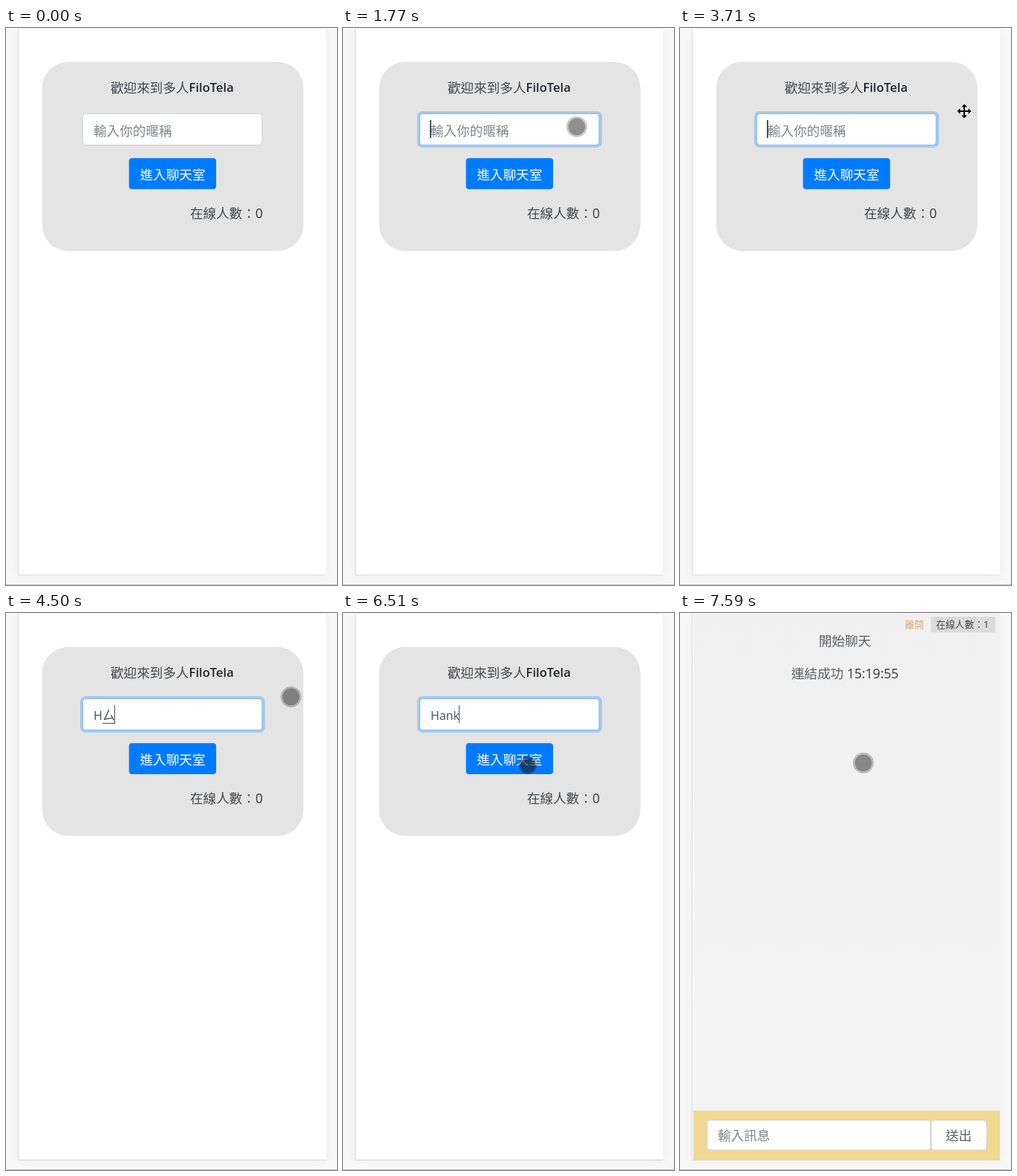
Recreate the animation shown at these times as an HTML page. Size 446 by 750 pixels, loop 8000 ms.

```html
<!DOCTYPE html>
<html lang="zh-Hant">
<head>
<meta charset="utf-8">
<title>Chat room</title>
<style>
html, body { margin: 0; width: 100%; height: 100%; overflow: hidden; background: #f8f8f8; }
.page { position: absolute; left: 16px; top: 2px; width: 414px; height: 734px; background: #fff;
  border: solid #dcdcdc; border-width: 0 0 1px 1px; box-shadow: 0 0 14px rgba(0, 0, 0, .05); }
.rule { position: absolute; left: 0; top: 749px; width: 446px; height: 1px; background: #c4c4c4; }
svg { position: absolute; left: 0; top: 0; width: 446px; height: 750px; }
text { font: 300 17.6px "Open Sans", "Noto Sans CJK TC", "Noto Sans CJK", sans-serif; fill: #43474b; white-space: pre; }
.num { font-weight: 400; fill: #34383c; }
.brand { font-weight: 600; font-size: 16.6px; fill: #212529; }
.hint { fill: #7d858c; }
.typed { font-weight: 400; font-size: 16px; fill: #495057; }
.white { fill: #fff; }
.grey { fill: #5c6064; }
.small { font-size: 12.8px; }
.leave { fill: #e0a875; }
.box { fill: #fff; stroke: #ced4da; }
</style>
</head>
<body>
<div class="page"></div>
<div class="rule"></div>
<svg viewBox="0 0 446 750">
  <defs>
    <linearGradient id="wall" x2="0" y2="1">
      <stop stop-color="#f0f0f0"/><stop offset="1" stop-color="#f4f4f4"/>
    </linearGradient>
    <radialGradient id="soft">
      <stop offset=".7" stop-color="#1a1a1a" stop-opacity=".62"/>
      <stop offset="1" stop-color="#1a1a1a" stop-opacity=".2"/>
    </radialGradient>
  </defs>

  <g id="login">
    <rect x="48.700" y="45.700" width="352" height="254.500" rx="35" fill="#e4e4e4"/>
    <text x="141" y="86.5">歡迎來到多人<tspan class="brand" dy="-.7">FiloTela</tspan></text>
    <rect class="box" x="103.5" y="115.5" width="241.5" height="42" rx="4"/>
    <g id="focus">
      <rect x="102" y="114" width="245" height="45" rx="5" fill="none" stroke="#007bff" stroke-opacity=".27" stroke-width="4"/>
      <rect x="103.5" y="115.5" width="241.5" height="42" rx="4" fill="#fff" stroke="#80bdff"/>
    </g>
    <text id="hint" class="hint" x="118" y="145">輸入你的暱稱</text>
    <text class="typed" x="118" y="143.5"><tspan id="name"></tspan><tspan id="compose" font-size="17.6"></tspan></text>
    <rect id="underline" y="148" height="1" fill="#495057"/>
    <rect id="caret" y="124" height="24" fill="#495057"/>
    <rect x="165.700" y="175.200" width="117.400" height="41.700" rx="4" fill="#007bff"/>
    <text class="white" x="180.5" y="204">進入聊天室</text>
    <text x="248" y="256">在線人數：<tspan class="num">0</tspan></text>
  </g>

  <g id="chat">
    <rect x="18" y="2" width="413" height="668" fill="url(#wall)"/>
    <text class="small leave" x="303" y="20">離開</text>
    <rect x="338" y="5" width="87" height="21" fill="#dcdcdc"/>
    <text class="small" x="345" y="20">在線人數：<tspan class="num">1</tspan></text>
    <text class="grey" x="187" y="43.5">開始聊天</text>
    <text class="grey" x="150" y="87.5">連結成功<tspan class="num"> 15:19:55</tspan></text>
    <rect x="18" y="670" width="413" height="66.5" fill="#f0d792"/>
    <rect class="box" x="36.5" y="683" width="301" height="40" rx="4"/>
    <text class="hint" x="51" y="709.5">輸入訊息</text>
    <rect class="box" x="338.5" y="683" width="74.5" height="40" rx="4"/>
    <text class="grey" x="358" y="709.5">送出</text>
  </g>

  <g id="pointer">
    <g id="dot">
      <circle r="12.5" fill="none" stroke="#000" stroke-opacity=".22" stroke-width="3"/>
      <circle r="11.2" fill-opacity=".44"/>
    </g>
    <circle id="press" r="12.5" fill="url(#soft)"/>
    <path id="cross" transform="translate(-1 -1)" stroke="#fff" stroke-width="1" paint-order="stroke"
      d="M0-9.5l4 4h-3v4.500h4.500v-3l4 4l-4 4v-3h-4.500v4.500h3l-4 4l-4-4h3v-4.500h-4.500v3l-4-4l4-4v3h4.500v-4.500h-3z"/>
  </g>
</svg>
<script>
const LOOP = 8000, STEP = 76, ENTER = 820, FOCUS = 1650, BLINK = 500;
const el = {};
document.querySelectorAll('svg [id]').forEach(e => el[e.id] = e);

// Pointer glides: start, number of steps, then the three points of a quadratic curve.
const glides = [
  { start: ENTER, steps: 9, curve: [[445, 68], [421, 97], [315, 133]] },
  { start: 2250, steps: 7, curve: [[315, 133], [371, 111], [384, 113]] },
  { start: 6040, steps: 8, curve: [[384, 113], [310, 292], [247, 202]] }
];
const clicks = [1610, 6490];
const grabs = [3710, 4730];

// The name is first typed in phonetic mode, then corrected.
const runs = [
  { start: 3860, every: 215, texts: ['H', 'Hㄇ', 'Hㄙ', 'Hㄙㄜ'] },
  { start: 4880, every: 126, texts: ['H', 'Ha', 'Han', 'Hank'] }
];

const clamp = v => Math.min(1, Math.max(0, v));
const easeOut = u => 1 - (1 - u) ** 2;
const fade = (t, start, length) => clamp((t - start) / length);
const during = (starts, length, t) => starts.some(s => t >= s && t < s + length);
const latest = (list, t) => list.filter(item => t >= item.start).pop();
const set = (e, attrs) => { for (const k in attrs) e.setAttribute(k, attrs[k]); };
const show = (e, on) => { e.style.display = on ? '' : 'none'; };

function pointerAt(t) {
  const { start, steps, curve: [a, b, c] } = latest(glides, t) || glides[0];
  const s = easeOut(clamp((Math.floor((t - start) / STEP) + 1) / steps));
  return a.map((v, i) => v * (1 - s) ** 2 + 2 * b[i] * s * (1 - s) + c[i] * s * s);
}

function textAt(t) {
  const run = latest(runs, t);
  if (!run) return { text: '', edited: FOCUS };
  const i = Math.min(run.texts.length - 1, Math.floor((t - run.start) / run.every));
  return { text: run.texts[i], edited: run.start + i * run.every };
}

function drawField(t) {
  const { text, edited } = textAt(t);
  const [name, compose] = [text.replace(/[ㄅ-ㄩ]/g, ''), text.replace(/\w/g, '')];
  el.name.textContent = name;
  el.compose.textContent = compose;
  show(el.hint, !text);
  const nameEnd = 118 + (name ? el.name.getComputedTextLength() : 0);
  const end = nameEnd + (compose ? el.compose.getComputedTextLength() : 0);
  set(el.underline, { x: nameEnd, width: end - nameEnd });
  set(el.caret, text ? { x: Math.round(end) - 1, width: 1 } : { x: 117, width: 2 });
  show(el.caret, t >= FOCUS && Math.floor((t - edited) / BLINK) % 2 === 0);
  el.focus.style.opacity = easeOut(fade(t, clicks[0] - 20, 200));
}

function drawPointer(t) {
  const form = during(clicks, STEP, t) ? 'press' : during(grabs, 150, t) ? 'cross' : 'dot';
  for (const id of ['dot', 'press', 'cross']) show(el[id], id === form);
  show(el.pointer, t >= ENTER);
  set(el.pointer, { transform: `translate(${pointerAt(t).map(Math.round)})` });
}

function draw(t) {
  const chat = fade(t, 7420, 170);
  el.chat.style.opacity = chat;
  el.login.style.opacity = 1 - chat;
  drawField(t);
  drawPointer(t);
}

let begin;
function tick(now) {
  begin ??= now;
  draw((now - begin) % LOOP);
  requestAnimationFrame(tick);
}
draw(0);
requestAnimationFrame(tick);
</script>
</body>
</html>
```
